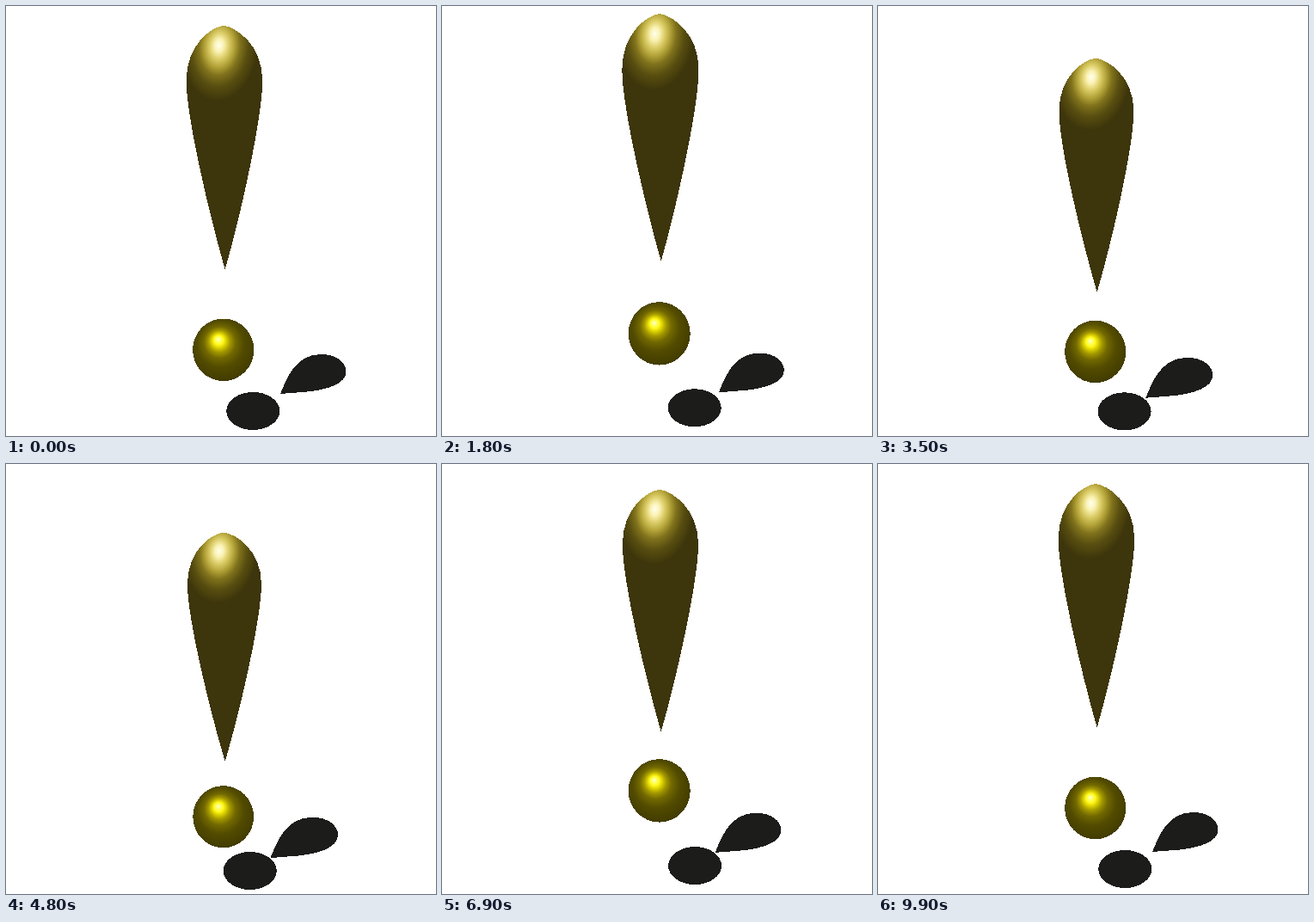
An HTML page that plays this animation: 500 by 500 pixels, repeating every 10000 ms.

```html
<!DOCTYPE html>
<html lang="en">
<head>
<meta charset="utf-8">
<title>Bouncing exclamation mark</title>
<style>
  html, body { margin: 0; width: 100%; height: 100%; overflow: hidden; background: #fff; }
  svg { display: block; width: 100vw; height: 100vh; }
</style>
</head>
<body>
<svg viewBox="0 0 500 500" shape-rendering="crispEdges">
  <defs>
    <radialGradient id="dropFill" gradientUnits="userSpaceOnUse" cx="0" cy="0" r="1" fx="-.04" fy="-.05"
      gradientTransform="translate(-5 26) rotate(6) scale(44 62)">
      <stop offset="0" stop-color="#fffff0"/>
      <stop offset=".12" stop-color="#faf2b4"/>
      <stop offset=".25" stop-color="#dccd68"/>
      <stop offset=".4" stop-color="#b0a036"/>
      <stop offset=".54" stop-color="#80721c"/>
      <stop offset=".74" stop-color="#584e10"/>
      <stop offset="1" stop-color="#3d350b"/>
    </radialGradient>
    <radialGradient id="ballFill" gradientUnits="userSpaceOnUse" cx="-2" cy="-4" r="40" fx="-6" fy="-12.5">
      <stop offset="0" stop-color="#ffffd8"/>
      <stop offset=".07" stop-color="#ffff68"/>
      <stop offset=".14" stop-color="#fff81c"/>
      <stop offset=".22" stop-color="#d8cd00"/>
      <stop offset=".32" stop-color="#a29700"/>
      <stop offset=".46" stop-color="#726800"/>
      <stop offset=".68" stop-color="#524b00"/>
      <stop offset="1" stop-color="#423c00"/>
    </radialGradient>
  </defs>
  <g fill="#1c1c1b">
    <path id="dropShadow" d="M0 0C6-14 16-46 47-46C66-46 76.5-36 76.5-26C76.5-11 53-5 33-2.6C21-1.4 11-1 0 0Z"/>
    <ellipse id="ballShadow" rx="31" ry="22"/>
  </g>
  <path id="drop" fill="url(#dropFill)"
    d="M-1 0C-15 1.5-44.3 22-44.3 64C-44.3 107-17 222 .7 283.5C18.5 222 44.2 107 44.2 64C44.2 22 13 1.5-1 0Z"/>
  <ellipse id="ball" rx="35.6" ry="36.3" fill="url(#ballFill)"/>
</svg>
<script>
const LOOP = 10, STEP = 0.1;

// Sum of harmonics of the loop, each given as [amplitude, time of its peak]
const wave = (mean, ...parts) => t => parts.reduce((sum, [amp, peak], i) =>
  sum + amp * Math.cos((i + 1) * 2 * Math.PI * (t - peak) / LOOP), mean);

const dropY = wave(34.8, [32.4, 4.72], [15.1, 4.73], [4, -.17], [2, .15]);
const ballY = wave(393, [5.4, 4.03], [12.5, 4.54], [1.5, .75], [.7, .29]);

function place(id, x, y, sx = 1, sy = sx) {
  document.getElementById(id).setAttribute('transform', `translate(${x} ${y}) scale(${sx} ${sy})`);
}

// Shadows and sizes follow the heights, as seen from above
function draw(t) {
  const top = dropY(t), d = top - 23;
  const mid = ballY(t), b = mid - 400;
  place('drop', 254, top, 1 - d * .0005, 1 - d * .00107);
  place('dropShadow', 319 - d * .205, 451 + d * .125, 1 + d * .0005);
  place('ball', 252.7, mid, 1 - b * .0006);
  place('ballShadow', 287.2 - b * .34, 471 + b * .195);
}

const start = performance.now();
function tick() {
  const s = Math.max(0, performance.now() - start) / 1000 % LOOP;
  draw(Math.floor(s / STEP + 1e-6) * STEP);
  requestAnimationFrame(tick);
}
tick();
</script>
</body>
</html>
```
